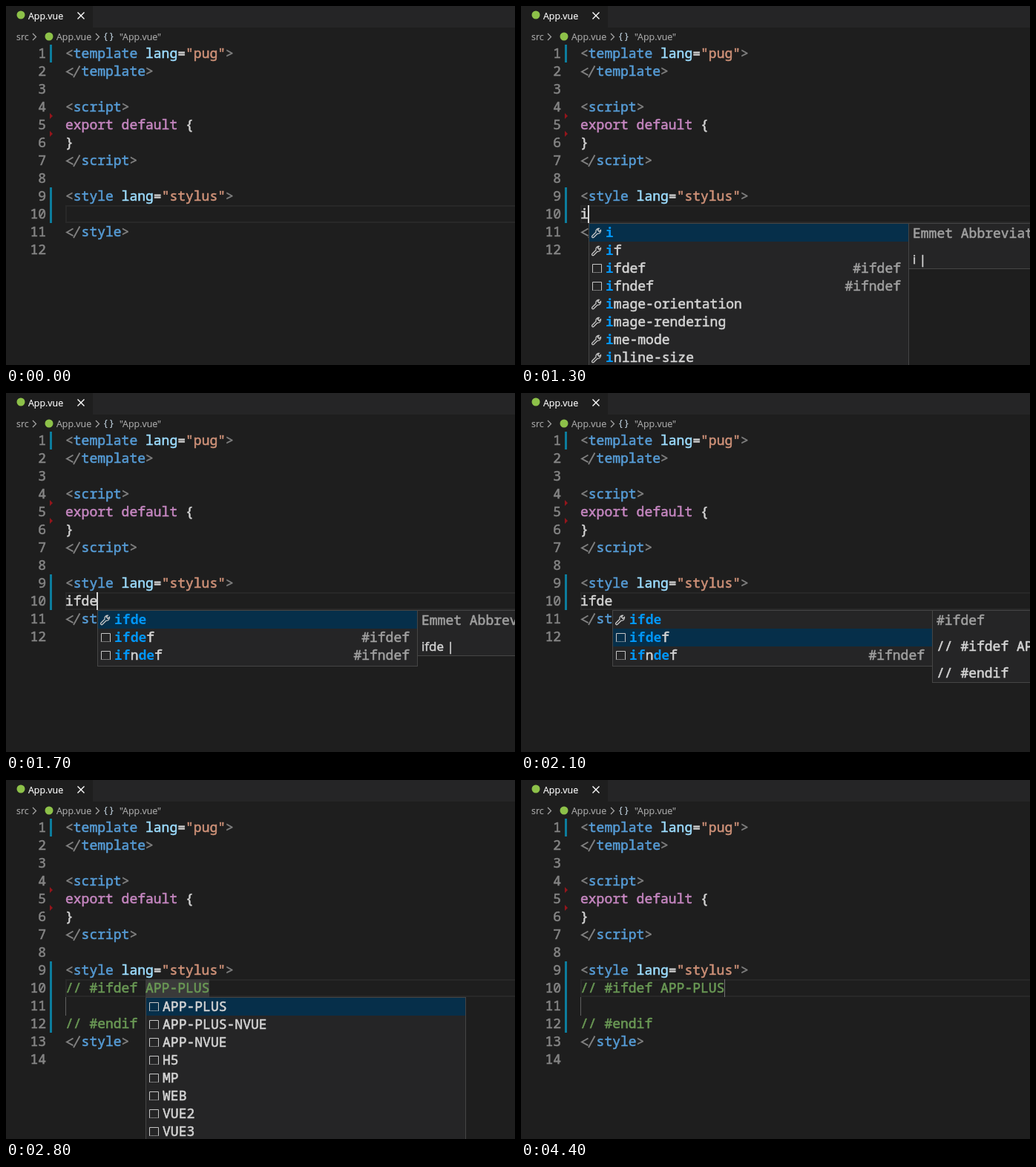
Animation of 686x483 px, one loop 4500 ms. Source, as an HTML page:

```html
<!DOCTYPE html>
<html lang="en">
<head>
<meta charset="utf-8">
<title>Snippet completion</title>
<style>
  html, body { margin: 0; width: 100%; height: 100%; overflow: hidden; background: #1e1e1e; }
  svg { display: block; width: 686px; height: 483px; }
  text { white-space: pre; fill: #d4d4d4; stroke: #d4d4d4; }
  .mono { font: 500 18px "Noto Sans Mono", "DejaVu Sans Mono", monospace; stroke-width: .55px; }
  .ui { font: 12.4px "Open Sans", "Noto Sans", sans-serif; stroke-width: .15px; }
  .doc { font: 17px "Open Sans", "Noto Sans", sans-serif; stroke-width: .5px; }
</style>
</head>
<body>
<svg id="stage" viewBox="0 0 686 483" width="686" height="483"></svg>
<script>
const LOOP = 4500, LEFT = 80, CHAR = 10.8, LINE = 24;
const COLOR = {
  plain: '#d4d4d4', punct: '#808080', tag: '#569cd6', attr: '#9cdcfe', string: '#ce9178',
  keyword: '#c586c0', comment: '#6a9955', match: '#0097fb', dim: '#a0a0a0', number: '#858585'
};
const GUTTER = '#0c7d9d', CRUMB = '#a9a9a9', ICON = '#c5c5c5';

const escape = s => String(s).replace(/&/g, '&amp;').replace(/</g, '&lt;');
const paint = color => `fill="${color}" stroke="${color}"`;
const span = (s, color, bold) =>
  `<tspan ${paint(COLOR[color])}${bold ? ' font-weight="700" stroke-width="0"' : ''}>${escape(s)}</tspan>`;
const text = (x, y, content, cls = 'mono', extra = '') =>
  `<text x="${x}" y="${y}" class="${cls}" ${extra}>${content}</text>`;
const rect = (x, y, w, h, fill, extra = '') =>
  `<rect x="${x}" y="${y}" width="${w}" height="${h}" fill="${fill}" ${extra}/>`;
const stroke = (d, color, width, extra = '') =>
  `<path d="${d}" fill="none" stroke="${color}" stroke-width="${width}" ${extra}/>`;
const middle = line => 40 + LINE * line;

// Lines are arrays of [text, color] pairs.
const openTag = (name, lang) => [
  ['<', 'punct'], [name, 'tag'], ...(lang ? [[' lang', 'attr'], ['=', 'plain'], [`"${lang}"`, 'string']] : []),
  ['>', 'punct']
];
const closeTag = name => [['</', 'punct'], [name, 'tag'], ['>', 'punct']];
const HEAD = [
  openTag('template', 'pug'), closeTag('template'), [],
  openTag('script'), [['export default ', 'keyword'], ['{', 'plain']], [['}', 'plain']], closeTag('script'), [],
  openTag('style', 'stylus')
];
const TAIL = [closeTag('style'), []];

function codeLine(tokens, number) {
  const y = middle(number);
  let out = text(54, y + 6, span(number, 'number'), 'mono', 'text-anchor="end"');
  let x = LEFT, rest = tokens;
  if (tokens.length && tokens[0][0] === '</') {
    out += stroke(`M90.5 ${y - 4.5}L82 ${y + .5}L90.5 ${y + 5.2}M99.5 ${y - 7.5}L91 ${y + 8}`, COLOR.punct, 1.9);
    x += 2 * CHAR;
    rest = tokens.slice(1);
  }
  return out + text(x, y + 6, rest.map(t => span(...t)).join(''));
}

function highlight(label, typed) {
  let next = 0;
  return [...label].map(c => {
    const hit = c === typed[next];
    if (hit) next++;
    return span(c, hit ? 'match' : 'plain', hit);
  }).join('');
}

const wrench = (x, y) => stroke(
  `M${x + 5.5} ${y - 3.5}l-2.2 2 -2-2 2-2.2a4 4 0 0 0-4.3 5l-5 5a1.4 1.4 0 0 0 2 2l5-5a4 4 0 0 0 4.5-4.8z`,
  ICON, 1.3);
const snippetIcon = (x, y) =>
  stroke(`M${x - 5.5} ${y + 5.5}V${y - 5.5}H${x + 6.5}V${y + 5.5}`, ICON, 1) +
  stroke(`M${x - 6} ${y + 5.5}H${x + 7}`, ICON, 1, 'stroke-dasharray="1 1"');

function suggestions({ x, items, typed, selected = 0, doc }) {
  let out = rect(x + .5, 292.5, 431, LINE * items.length + 3, '#252526', 'stroke="#454545"');
  items.forEach(([label, kind, note], i) => {
    const y = 305 + LINE * i;
    if (i === selected) out += rect(x + 1, y - 12, 430, LINE, '#062f4a');
    out += (kind === 'wrench' ? wrench : snippetIcon)(x + 11, y);
    out += text(x + 23, y + 6, highlight(label, typed));
    if (note && i !== selected)
      out += text(x + 421, y + 6, span(note, 'dim'), 'mono', 'text-anchor="end"');
  });
  if (!doc) return out;
  out += rect(x + 431.5, 292.5, 500, doc.height, '#252526', 'stroke="#454545"');
  out += text(x + 437, 312, span(doc.title, 'dim'));
  doc.lines.forEach((s, i) => out += text(x + 437, 347 + 18 * i, escape(s), doc.cls));
  return out;
}

const IFDEF = ['ifdef', 'snippet', '#ifdef'], IFNDEF = ['ifndef', 'snippet', '#ifndef'];
const wrenches = (...labels) => labels.map(s => [s, 'wrench']);
const CHOICES = ['APP-PLUS', 'APP-PLUS-NVUE', 'APP-NVUE', 'H5', 'MP', 'WEB', 'VUE2', 'VUE3']
  .map(s => [s, 'snippet']);

function completions(typed) {
  const extra = typed === 'i' ? wrenches('if') : [];
  const more = {
    i: wrenches('image-orientation', 'image-rendering', 'ime-mode', 'inline-size'),
    if: wrenches('color-interpolation-filters')
  }[typed] || [];
  return [[typed, 'wrench'], ...extra, IFDEF, IFNDEF, ...more];
}

const typing = typed => ({
  body: [[[typed, typed === 'if' ? 'keyword' : 'plain']]],
  column: typed.length, cursor: true,
  popup: {
    x: Math.round(LEFT + CHAR * typed.length), typed, items: completions(typed),
    doc: { title: 'Emmet Abbreviation', lines: [typed + ' |'], cls: 'doc', height: 61 }
  }
});
const blank = cursor => ({ body: [[]], column: 0, cursor });
const expanded = (color, extra) => ({
  body: [[['// #ifdef APP-PLUS', color]], [], [['// #endif', color]]],
  column: 10, cursor: true, selection: true, stop: true, ...extra
});
const picking = { popup: { x: 188, typed: '', items: CHOICES } };
const chosen = cursor => expanded('comment', { column: 18, cursor, selection: false, changed: 4, edge: true });

const picked = typing('ifde');
picked.cursor = false;
picked.popup.selected = 1;
picked.popup.doc = {
  title: '#ifdef', lines: ['// #ifdef APP-PLUS', '', '// #endif'], cls: 'mono', height: 97
};

const STATES = [
  [0, blank(false)], [600, blank(true)], [1100, blank(false)],
  [1300, typing('i')], [1400, typing('if')], [1600, typing('ifd')], [1700, typing('ifde')],
  [2100, picked],
  [2300, expanded('plain')],
  [2400, expanded('comment', picking)],
  [2500, expanded('comment', { ...picking, changed: 4 })],
  [2800, expanded('comment', { ...picking, changed: 4, cursor: false })],
  [3200, chosen(true)], [3600, chosen(false)], [4100, chosen(true)], [4400, chosen(false)]
];

function chrome() {
  const label = (x, y, s, color) => text(x, y, `<tspan ${paint(color)}>${escape(s)}</tspan>`, 'ui');
  const chevron = x => stroke(`M${x} 37l4.5 4.5-4.5 4.5`, CRUMB, 1.2);
  const marker = y => `<path d="M59 ${y - 4}l4 4-4 4z" fill="#94151b"/>`;
  return rect(0, 0, 686, 483, '#1e1e1e') + rect(117, 0, 569, 29, '#252526') +
    '<circle cx="20" cy="12" r="5.5" fill="#8dc149"/><circle cx="58" cy="41" r="5.5" fill="#8dc149"/>' +
    label(30, 18, 'App.vue', '#fff') + stroke('M96.5 8.5l9 9m0-9l-9 9', '#fff', 1.4) +
    label(14, 46, 'src', CRUMB) + chevron(36) + label(68, 46, 'App.vue', CRUMB) + chevron(121) +
    label(132, 45, '{ }', '#c5d7e5') + label(153, 46, '"App.vue"', CRUMB) +
    marker(148) + marker(172) + rect(59, 52, 3, LINE, GUTTER);
}

function picture(s) {
  const cursorX = Math.max(LEFT, Math.round(LEFT + CHAR * s.column) - 1);
  let out = chrome() + rect(59, 244, 3, LINE * (s.changed || 2), GUTTER);
  out += rect(81, 269, 700, 22, 'none', 'stroke="#282828" stroke-width="2"');
  if (s.selection) out += rect(188, 268, 86, LINE, '#3a3a3a');
  if (s.stop) out += rect(LEFT, 292, 1, 25, '#5f5f5f');
  if (s.edge) out += rect(274, 268, 1, LINE, '#707070');
  out += [...HEAD, ...s.body, ...TAIL].map((tokens, i) => codeLine(tokens, i + 1)).join('');
  if (s.cursor) out += rect(cursorX, 268, 2, LINE, '#d4d4d4');
  return out + (s.popup ? suggestions(s.popup) : '');
}

const stage = document.getElementById('stage');
const start = performance.now();
let shown;

function update(now) {
  const t = Math.max(0, now - start) % LOOP;
  const state = STATES.filter(([at]) => at <= t).pop()[1];
  if (state !== shown) stage.innerHTML = picture(shown = state);
  requestAnimationFrame(update);
}
update(start);
</script>
</body>
</html>
```
